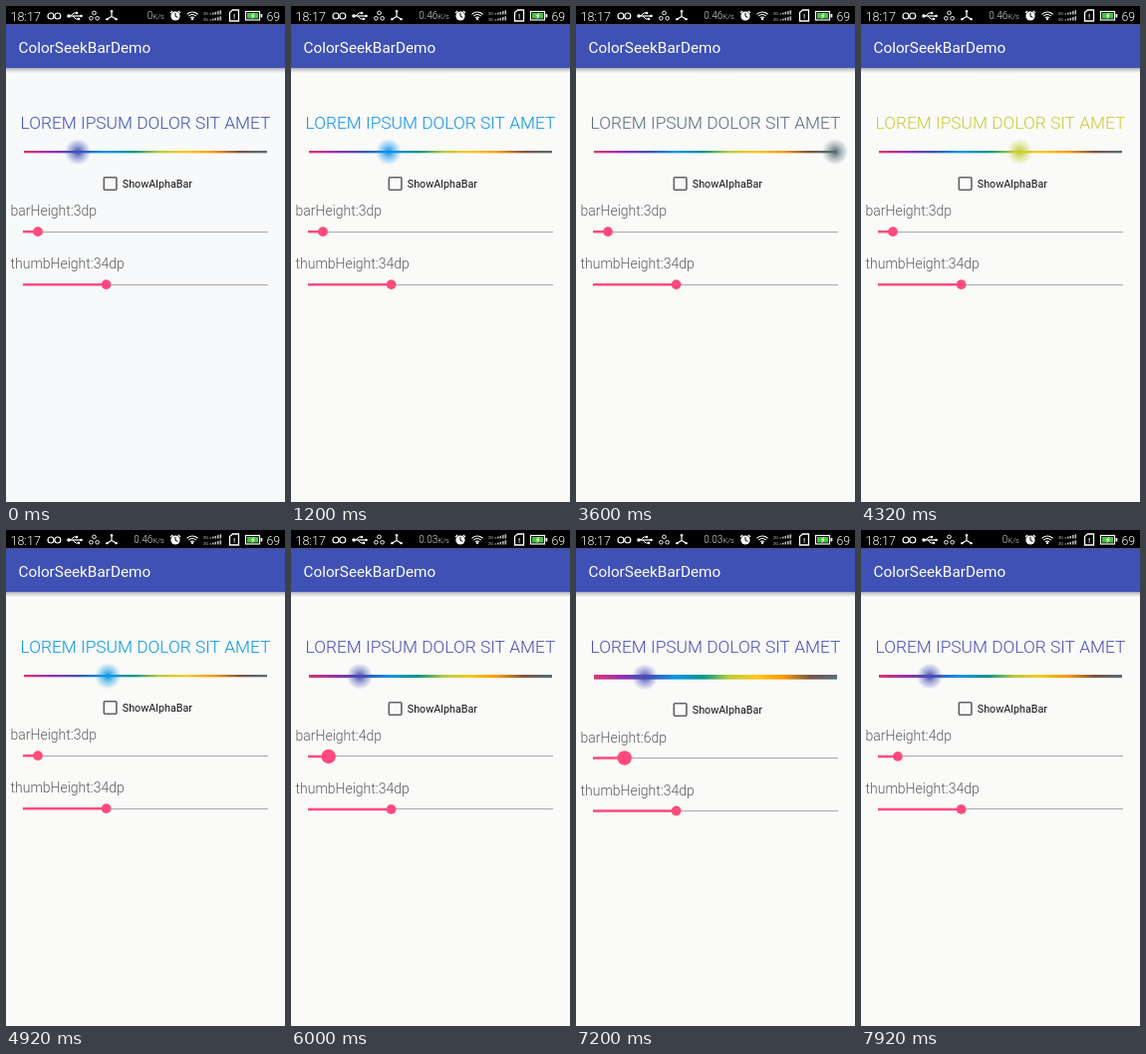
Write an HTML page with a canvas that moves like this. It is 280 by 497 pixels and loops after 8000 ms.

```html
<!DOCTYPE html>
<html lang="en">
<head>
<meta charset="utf-8">
<title>ColorSeekBarDemo</title>
<style>
html, body { margin: 0; width: 100%; height: 100%; overflow: hidden; background: #fafaf9; }
canvas { display: block; width: 280px; height: 497px; }
</style>
</head>
<body>
<canvas id="stage"></canvas>
<script>
const W = 280, H = 497, LOOP = 8000, STEP = 120, DP = W / 360;
const LEFT = 18, LENGTH = 244;
const STATUS = 24 * DP, HEADER = 80 * DP;
const PINK = '#ff4a7e', INDIGO = '#3f51b5', GREY = '#5c5c5c';
// Evenly spaced along the colour bar
const COLORS = [
  '#e0356c', '#9730b0', '#3f51b5', '#0a96ec', '#009486',
  '#b8cc3c', '#ffc81e', '#ff9800', '#795548', '#546e7a'
];

const canvas = document.getElementById('stage');
const ratio = window.devicePixelRatio || 1;
canvas.width = W * ratio;
canvas.height = H * ratio;
const c = canvas.getContext('2d');

const progress = (t, from, to) => Math.min(1, Math.max(0, (t - from) / (to - from)));
const easeOut = u => 1 - (1 - u) ** 1.85;
const channels = hex => [1, 3, 5].map(i => parseInt(hex.slice(i, i + 2), 16));
const rgba = (rgb, alpha = 1) => `rgba(${rgb.join()},${alpha})`;

function colorAt(x) {
  const pos = (x - LEFT) / LENGTH * (COLORS.length - 1);
  const i = Math.min(Math.floor(pos), COLORS.length - 2);
  const next = channels(COLORS[i + 1]);
  return channels(COLORS[i]).map((v, k) => Math.round(v + (next[k] - v) * (pos - i)));
}

function rect(x, y, w, h, color) {
  c.fillStyle = color;
  c.fillRect(x, y, w, h);
}

function disc(x, y, r, color = '#fff') {
  c.fillStyle = color;
  c.beginPath();
  c.arc(x, y, r, 0, Math.PI * 2);
  c.fill();
}

function arc(x, y, r, width = 1, from = 0, to = Math.PI * 2) {
  c.lineWidth = width;
  c.beginPath();
  c.arc(x, y, r, from, to);
  c.stroke();
}

function line(points, width = 1) {
  c.lineWidth = width;
  c.beginPath();
  points.forEach(([x, y]) => c.lineTo(x, y));
  c.stroke();
}

function text(str, x, y, size, color, weight = 400, align = 'left') {
  c.font = `${weight} ${size}px Roboto, sans-serif`;
  c.textAlign = align;
  c.fillStyle = color;
  c.fillText(str, x, y);
}

function connectionIcons() {
  arc(45, 10, 3, 1.2);
  arc(51.8, 10, 3, 1.2);

  line([[62, 10], [75, 10]], 1.2);
  line([[65, 10], [68, 7], [71, 7]]);
  line([[67, 10], [70, 13], [73, 13]]);
  disc(63, 10, 1.8);
  disc(71, 7, 1.3);
  disc(73, 13, 1.3);
  disc(75.5, 10, 1.3);

  for (let i = 0; i < 3; i++) {
    const angle = (i / 3 - 1 / 4) * Math.PI * 2;
    const dx = Math.cos(angle), dy = Math.sin(angle);
    arc(88.5 + dx * 3.6, 10.5 + dy * 3.6, 1.8);
    line([[106, 10.5], [106 + dx * 5.5, 10.5 + dy * 5.5]], 1.2);
    disc(106 + dx * 5.3, 10.5 + dy * 5.3, 1.2);
  }
}

function alarmIcon(x, y) {
  disc(x, y, 4.6);
  for (const side of [-1, 1]) line([[x + side * 5, y - 3], [x + side * 2.8, y - 5]], 1.2);
  c.strokeStyle = '#000';
  line([[x, y - 3], [x, y + 0.4], [x + 2.4, y + 1.4]]);
  c.strokeStyle = '#fff';
}

function signalIcons() {
  for (const r of [2.5, 5, 7.5]) arc(187, 13.5, r, 1.2, -Math.PI * 0.76, -Math.PI * 0.24);
  disc(187, 13, 1.2);

  for (const base of [8.5, 14.5]) {
    text('2G', 198, base, 4, '#ccc');
    for (let i = 0; i < 5; i++) rect(204.5 + i * 2.5, base - 1 - i * 0.8, 1.6, 1 + i * 0.8, '#bbb');
  }
}

function powerIcons() {
  line([[227, 4], [233.5, 4], [233.5, 15], [224.5, 15], [224.5, 6.5], [227.5, 4]], 1.3);
  text('!', 229, 13, 8, '#fff', 500, 'center');

  c.lineWidth = 1.2;
  c.strokeRect(240.5, 5.5, 14, 8.5);
  rect(255.5, 8, 1.8, 3.5, '#fff');
  rect(242, 7, 11, 5.5, '#43c53e');
  line([[249, 7], [246.5, 10], [249, 9.7], [247, 12.5]]);
}

function statusBar(speed) {
  rect(0, 0, W, STATUS, '#000');
  c.strokeStyle = '#fff';
  text('18:17', 4.5, 14.5, 12.5, '#fff', 300);
  connectionIcons();
  text(speed, 147.3, 13, 10, '#ddd', 300, 'right');
  text('K/s', 147.5, 12.5, 7.4, '#ddd', 300);
  alarmIcon(170, 10);
  signalIcons();
  powerIcons();
  text('69', 261.5, 14.5, 12.3, '#fff', 300);
}

function appBar() {
  rect(0, STATUS, W, HEADER - STATUS, INDIGO);
  const shade = c.createLinearGradient(0, HEADER, 0, HEADER + 5);
  shade.addColorStop(0, 'rgba(0,0,0,.25)');
  shade.addColorStop(1, 'rgba(0,0,0,0)');
  rect(0, HEADER, W, 5, shade);
  text('ColorSeekBarDemo', 12.5, 47, 15.3, '#fff');
}

function colorBar(x, dp, rgb) {
  const thick = dp * DP, top = 145, mid = top + thick / 2, radius = 17 * DP;
  const grad = c.createLinearGradient(LEFT, 0, LEFT + LENGTH, 0);
  COLORS.forEach((color, i) => grad.addColorStop(i / (COLORS.length - 1), color));
  rect(LEFT, top, LENGTH, thick, grad);

  const glow = c.createRadialGradient(x, mid, 0, x, mid, radius);
  glow.addColorStop(0, rgba(rgb));
  glow.addColorStop(0.5, rgba(rgb, 0.45));
  glow.addColorStop(1, rgba(rgb, 0));
  disc(x, mid, radius, glow);
}

function slider(value, y, pressed) {
  const x = 17.3 + value * 245;
  rect(17, Math.floor(y), 246, 1, '#a8a8a8');
  rect(17, y - 1.2, x - 17, 2.5, PINK);
  disc(x, y, pressed ? 7.2 : 4.9, PINK);
}

function checkBox(y) {
  c.strokeStyle = '#626262';
  c.lineWidth = 1.6;
  c.beginPath();
  c.roundRect(98.3, y - 6.3, 12.6, 12.6, 1);
  c.stroke();
  text('ShowAlphaBar', 116.8, y + 4, 10.75, '#111');
}

function setting(label, value, y, pressed) {
  text(label, 4.5, Math.round(y), 18 * DP, GREY, 300);
  slider(value, y + 15.8, pressed);
}

function draw(t) {
  const x = 72 + 188 * easeOut(progress(t, 1050, 3000)) - 191 * easeOut(progress(t, 3600, 5760));
  const height = 3 + 7 * progress(t, 5880, 6600) - 6 * progress(t, 6840, 7440);
  const dp = Math.round(height);
  const shift = (dp - 3) * DP;
  const rgb = colorAt(x);
  const speed = t < 720 || t >= 7680 ? '0' : t < 5400 ? '0.46' : '0.03';

  c.setTransform(ratio, 0, 0, ratio, 0, 0);
  rect(0, 0, W, H, t < 720 ? '#f7f9fb' : '#fafaf9');
  statusBar(speed);
  appBar();
  text('LOREM IPSUM DOLOR SIT AMET', 140, 122.7, 17.35, rgba(rgb), 300, 'center');
  colorBar(x, dp, rgb);
  checkBox(178 + Math.round(shift));
  setting(`barHeight:${dp}dp`, height / 50, 210.3 + shift, t >= 6000 && t < 7920);
  setting('thumbHeight:34dp', 0.34, 263.3 + shift, false);
}

const start = performance.now();
function tick() {
  const t = (performance.now() - start) % LOOP;
  draw(Math.floor(t / STEP) * STEP);
  requestAnimationFrame(tick);
}
tick();
</script>
</body>
</html>
```
